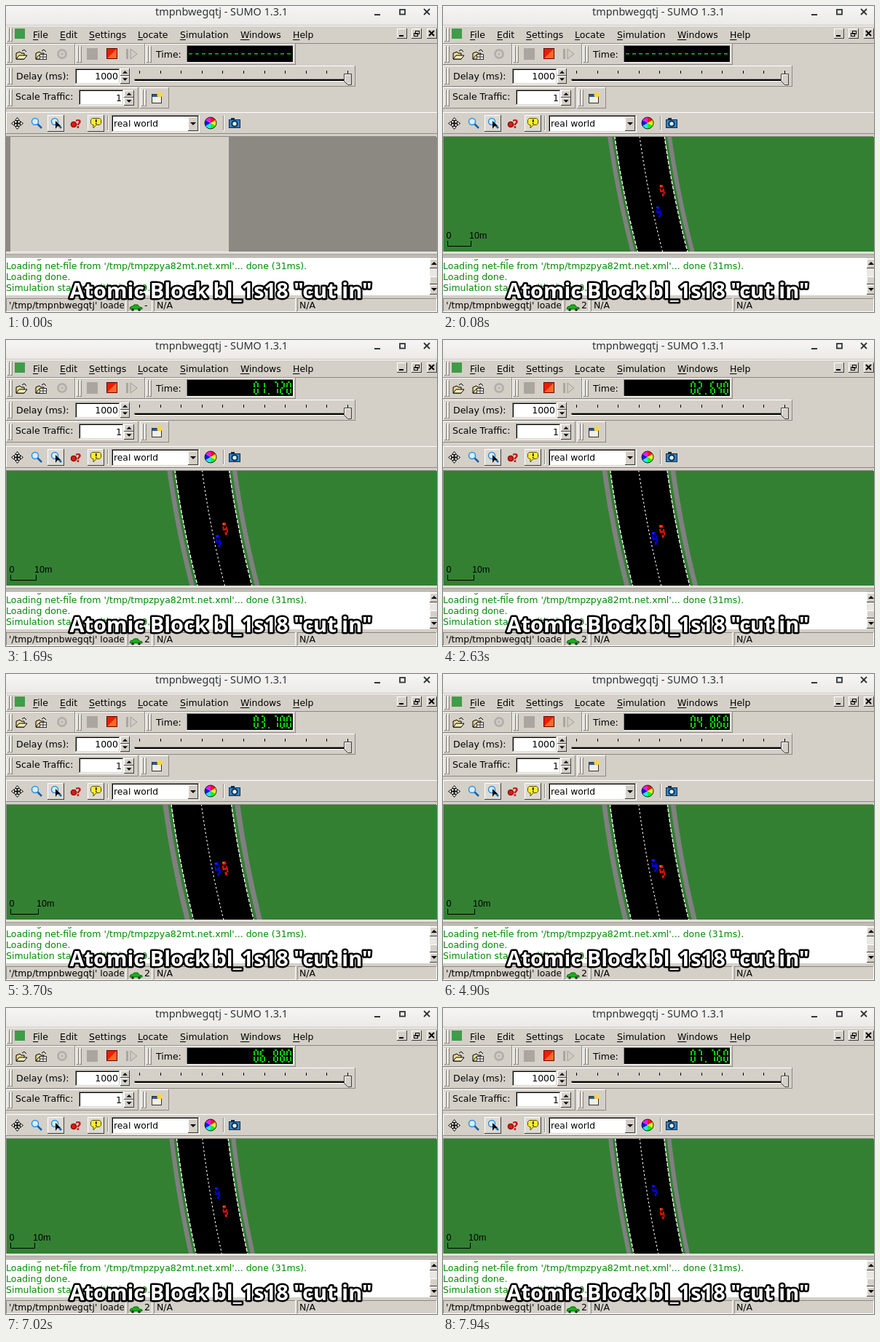
An HTML page with a canvas that plays this animation: 592 by 421 pixels, repeating every 8 s.

```html
<!DOCTYPE html>
<html lang="en">
<head>
<meta charset="utf-8">
<title>Traffic simulation window</title>
<style>
html, body { margin: 0; width: 100%; height: 100%; overflow: hidden; background: #d4d0c8; }
canvas { display: block; width: 592px; height: 421px; }
</style>
</head>
<body>
<canvas id="stage" width="592" height="421"></canvas>
<script>
const ctx = document.getElementById('stage').getContext('2d');
const LOOP = 8000, REPAINT = 50;
const UI = '"DejaVu Sans", sans-serif';
const FACE = '#d4d0c8', SHADE = '#8c8882';

// One car falls back while the other passes it; the view zooms to keep both in sight.
function poseAt(t) {
  const s = (t - 870) / 1000;
  const redY = 257 + 3.68 * s;
  const blueY = 280 - 4.1 * s;
  const gap = Math.abs(blueY - redY);
  return {
    redY, blueY,
    blueX: 291 + 2.5 * Math.exp(-Math.max(s, -1)),
    half: 41.5 - 0.25 * gap,
    top: 268.5 + 0.06 * gap,
    bottom: 301 - 0.75 * s,
    clock: 0.94 + 0.967 * (s + 0.02)
  };
}

function box(color, x, y, w, h) {
  ctx.fillStyle = color;
  ctx.fillRect(x, y, w, h);
}

function text(str, x, y, { size = 12.5, color = '#000', align = 'left', font = UI, weight = '' } = {}) {
  ctx.font = `${weight} ${size}px ${font}`;
  ctx.fillStyle = color;
  ctx.textAlign = align;
  ctx.fillText(str, x, y);
}

function clipped(x, y, w, h, paint) {
  ctx.save();
  ctx.beginPath();
  ctx.rect(x, y, w, h);
  ctx.clip();
  paint();
  ctx.restore();
}

function poly(color, points, stroke) {
  ctx.beginPath();
  points.forEach(([x, y]) => ctx.lineTo(x, y));
  ctx.closePath();
  if (color) { ctx.fillStyle = color; ctx.fill(); }
  if (stroke) { ctx.strokeStyle = stroke; ctx.lineWidth = 1; ctx.stroke(); }
}

function line(color, width, ...points) {
  ctx.beginPath();
  points.forEach(([x, y]) => ctx.lineTo(x, y));
  ctx.strokeStyle = color;
  ctx.lineWidth = width;
  ctx.stroke();
}

function frame(color, width, x, y, w, h) {
  ctx.strokeStyle = color;
  ctx.lineWidth = width;
  ctx.strokeRect(x, y, w, h);
}

function disc(color, x, y, r, stroke, width = 1) {
  ctx.beginPath();
  ctx.arc(x, y, r, 0, 7);
  if (color) { ctx.fillStyle = color; ctx.fill(); }
  if (stroke) { ctx.strokeStyle = stroke; ctx.lineWidth = width; ctx.stroke(); }
}

function bevel(x, y, w, h, light = '#fff', dark = SHADE) {
  box(light, x, y, w, 1);
  box(light, x, y, 1, h);
  box(dark, x, y + h - 1, w, 1);
  box(dark, x + w - 1, y, 1, h);
}

function sunken(x, y, w, h, fill) {
  box(fill, x, y, w, h);
  bevel(x, y, w, h, SHADE, '#fff');
}

function entry(x, y, w, h) {
  sunken(x, y, w, h, '#fff');
  bevel(x + 1, y + 1, w - 2, h - 2, '#000', FACE);
}

function button(x, y, w, h, fill = FACE) {
  box(fill, x, y, w, h);
  bevel(x, y, w, h, '#fff', '#404040');
}

function grip(x, y, h) {
  for (const dx of [0, 4]) bevel(x + dx, y, 3, h);
}

function toolbar(x, y, w, h) {
  bevel(x, y, w, h);
  grip(x + 2, y + 3, h - 6);
}

function triangle(x, y, r, up, color = '#000') {
  const d = up ? -r : r;
  poly(color, [[x - r, y - d / 2], [x + r, y - d / 2], [x, y + d / 2]]);
}

function spinner(x, y, w, h) {
  const half = Math.floor(h / 2);
  button(x, y, w, half);
  button(x, y + half, w, h - half);
  triangle(x + w / 2, y + half / 2, 3.5, true);
  triangle(x + w / 2, y + half * 1.5, 3.5, false);
}

function folder(x, y) {
  poly('#e9d78c', [[x, y + 5], [x + 5, y + 3], [x + 7, y + 5], [x + 11, y + 5], [x + 11, y + 13], [x, y + 13]], '#000');
  poly('#fff6c0', [[x + 4, y + 8], [x + 15, y + 8], [x + 11, y + 13], [x, y + 13]], '#000');
  line('#000', 1, [x + 8, y + 2], [x + 11, y], [x + 14, y + 3]);
}

function magnifier(x, y) {
  line('#1762a5', 2.5, [x + 2, y + 2], [x + 8, y + 8]);
  disc('#d8eefc', x - 1, y - 1, 4.5, '#2a90e0', 1.5);
}

function titleBar() {
  const g = ctx.createLinearGradient(0, 0, 0, 26);
  g.addColorStop(0, '#f6f5f3');
  g.addColorStop(1, '#eceae7');
  box(g, 0, 0, 592, 26);
  box('#c5c0b9', 0, 26, 592, 1);
  text('tmpnbwegqtj - SUMO 1.3.1', 296, 13, { size: 14.4, weight: 500, color: '#2e3436', align: 'center', font: '"Noto Sans", sans-serif' });
  box('#2e3436', 506, 11, 8, 2);
  frame('#2e3436', 1.8, 541, 5, 7, 6.5);
  line('#2e3436', 1.8, [574, 4], [582, 12]);
  line('#2e3436', 1.8, [582, 4], [574, 12]);
}

function menuBar() {
  bevel(0, 27, 594, 25);
  grip(2, 30, 19);
  box('#3f9c48', 12, 31, 14, 14);
  let x = 37;
  for (const name of ['File', 'Edit', 'Settings', 'Locate', 'Simulation', 'Windows', 'Help']) {
    text(name, x, 44);
    box('#000', x, 46, ctx.measureText(name[0]).width, 1);
    x += Math.round(ctx.measureText(name).width) + 16;
  }
  for (const left of [537, 557, 578]) button(left, 31, 14, 14);
  box('#000', 540, 40, 6, 2);
  frame('#000', 1, 562.5, 34.5, 5, 4);
  frame('#000', 1, 560.5, 37.5, 5, 4);
  line('#000', 2, [581, 34], [588, 41]);
  line('#000', 2, [588, 34], [581, 41]);
}

function runBar() {
  toolbar(0, 52, 95, 29);
  toolbar(95, 52, 96, 29);
  toolbar(191, 52, 207, 29);
  folder(14, 60);
  folder(41, 60);
  box('#f4f4f4', 46, 66, 9, 8);
  frame('#333', 1, 46.5, 66.5, 9, 7);
  line('#333', 1, [46, 70], [56, 70]);
  line('#333', 1, [51, 66], [51, 74]);
  disc(null, 77, 66, 5.5, '#b4b0a9', 3);
  disc('#bcb8b1', 77, 66, 2);
  box('#aaa69f', 111, 58, 15, 16);
  box('#f01c00', 138, 58, 15, 15);
  poly('#ff6a28', [[138, 73], [153, 58], [153, 73]]);
  bevel(138, 58, 15, 15, '#600', '#600');
  box('#aaa69f', 165, 59, 3, 14);
  poly('#d0ccc4', [[171, 59], [180, 66], [171, 73]], '#a09c95');
  text('Time:', 206, 71);
}

function delayBar() {
  toolbar(0, 82, 480, 29);
  text('Delay (ms):', 14, 101);
  entry(95, 86, 62, 22);
  text('1000', 154, 101, { align: 'right' });
  spinner(157, 86, 13, 21);
  for (let i = 0; i <= 10; i++) box('#000', Math.round(183 + i * 28.6), 89, 1, 4);
  sunken(176, 100, 299, 4, '#000');
  box('#fff', 177, 103, 296, 1);
  poly(FACE, [[464.5, 93.5], [474.5, 93.5], [474.5, 108.5], [469.5, 108.5], [464.5, 103.5]], '#404040');
  line('#fff', 1, [465.5, 103], [465.5, 94.5], [473, 94.5]);
}

function scaleBar() {
  toolbar(0, 112, 182, 29);
  toolbar(184, 112, 40, 29);
  text('Scale Traffic:', 13, 129);
  entry(100, 115, 62, 22);
  text('1', 159, 131, { align: 'right' });
  spinner(162, 116, 14, 21);
  box('#333', 200, 121, 14, 13);
  box('#f2f0e4', 201, 125, 12, 8);
  box('#2457a8', 201, 122, 12, 3);
  disc('#ffd63c', 211, 122, 3.5);
}

function viewBar() {
  bevel(0, 146, 594, 30);
  for (const [dx, dy] of [[1, 0], [-1, 0], [0, 1], [0, -1]]) {
    line('#000', 1.6, [15.5, 161.5], [15.5 + dx * 6, 161.5 + dy * 6]);
    poly('#fff', [[15.5 + dx * 8, 161.5 + dy * 8], [15.5 + dx * 4 + dy * 3, 161.5 + dy * 4 + dx * 3], [15.5 + dx * 4 - dy * 3, 161.5 + dy * 4 - dx * 3]], '#000');
  }
  magnifier(41, 160);
  button(57, 150, 23, 23, '#dedad3');
  magnifier(68, 160);
  poly('#000', [[68, 158], [75, 165], [71, 165], [68, 169]]);
  disc('#d61c12', 93, 163, 3.8, '#600');
  text('?', 95, 168, { size: 15, weight: 700, color: '#c81810' });
  button(112, 150, 23, 23, '#dedad3');
  poly('#ffee30', [[118.5, 154.5], [128.5, 154.5], [130.5, 156.5], [130.5, 161.5], [128.5, 163.5], [124, 163.5], [120, 168], [120, 163.5], [118.5, 163.5], [116.5, 161.5], [116.5, 156.5]], '#554d00');
  box('#000', 123, 156, 1.5, 4);
  box('#000', 123, 161, 1.5, 1.5);
  for (const x of [139, 298]) bevel(x, 151, 2, 21, SHADE, '#fff');
  entry(145, 150, 121, 24);
  text('real world', 148, 166, { size: 12.3 });
  button(250, 152, 14, 20);
  triangle(257, 162, 4, false);
  for (let i = 0; i < 6; i++) {
    ctx.beginPath();
    ctx.moveTo(281, 161);
    ctx.arc(281, 161, 8, i * Math.PI / 3 - 1.57, (i + 1) * Math.PI / 3 - 1.57);
    ctx.fillStyle = `hsl(${i * 60} 90% 52%)`;
    ctx.fill();
  }
  disc(null, 281, 161, 8, '#222');
  box('#102a44', 306, 156, 16, 12);
  box('#2f83c8', 307, 157, 14, 10);
  box('#102a44', 309, 154, 5, 3);
  disc('#d8efff', 314, 162, 3.6, '#123', 1.8);
}

const DIGITS = ['abcdef', 'bc', 'abged', 'abgcd', 'fgbc', 'afgcd', 'afgcde', 'abc', 'abcdefg', 'abcdfg'];

function drawDigit(digit, x) {
  const lit = s => DIGITS[digit].includes(s);
  [...'agd'].forEach((s, row) => lit(s) && box('#00d000', x + 2, 57 + row * 8, 3, 2));
  [...'fbec'].forEach((s, i) => lit(s) && box('#00d000', x + (i % 2) * 5, 59 + (i >> 1) * 8, 2, 6));
}

function clockDisplay(seconds) {
  const pitch = 9, left = 250;
  sunken(248, 54, 147, 24, '#000');
  if (seconds === null) {
    for (let i = 0; i < 16; i++) box('#00c800', left + 1 + i * pitch, 65, 5, 1.5);
    return;
  }
  const shown = (Math.round(seconds * 50) / 50).toFixed(3).padStart(6, '0');
  [...shown].forEach((c, i) => {
    const x = left + (10 + i) * pitch;
    if (c === '.') box('#00d000', x + 2, 73, 2, 2);
    else drawDigit(c, x);
  });
}

function roadLine(pose, offset, color, width, dash = []) {
  const { top, bottom, half } = pose, d = bottom - top;
  ctx.beginPath();
  for (let u = -0.15; u <= 1.2; u += 0.05) {
    ctx.lineTo(top + offset * half + d * (u - 0.3 * u * (1 - u)), 181 + u * 157);
  }
  ctx.setLineDash(dash);
  ctx.strokeStyle = color;
  ctx.lineWidth = width;
  ctx.stroke();
  ctx.setLineDash([]);
}

function car(x, y, color, lamp, scale) {
  ctx.save();
  ctx.translate(x, y);
  ctx.rotate(-0.17);
  ctx.scale(scale, scale);
  box(color, -3, -9, 5, 4);
  box(lamp, -3, -9, 3, 2);
  box(color, -4, -4, 2, 6);
  box(color, 1, -3, 2, 9);
  box(color, -2, -1, 3, 3);
  box(color, -2, 5, 3, 4);
  ctx.restore();
}

function roadView(pose, withCars) {
  const { half } = pose;
  box('#338033', 0, 180, 592, 160);
  roadLine(pose, 0, '#000', half * 1.97);
  for (const side of [-1, 1]) {
    roadLine(pose, side * 1.2, '#808080', half * 0.17);
    roadLine(pose, side, '#fff', 1.3, [5, 2]);
  }
  roadLine(pose, 0, '#fff', 1.1, [2.5, 3]);
  if (withCars) {
    car(pose.blueX, pose.blueY, '#0000f4', '#2020ff', half / 40);
    car(301.5, pose.redY, '#f41000', '#ff6a30', half / 40);
  }
  const end = Math.round(6 + half * 0.93);
  const label = { size: 12.5, font: '"Liberation Sans", sans-serif' };
  text('0', 4.5, 320, label);
  text('10m', end - 2, 320, label);
  line('#000', 1, [6.5, 323], [6.5, 330.5], [end + 0.5, 330.5], [end + 0.5, 323]);
}

function emptyView() {
  box(SHADE, 1, 180, 5, 158);
  box(SHADE, 306, 180, 286, 158);
}

function logPane() {
  box('#fff', 0, 338, 592, 1);
  box(SHADE, 0, 342, 592, 1);
  box(SHADE, 0, 345, 592, 1);
  box('#fff', 0, 346, 582, 52);
  clipped(0, 348, 582, 50, () => {
    const lines = ['Loading configuration ... done.', "Loading net-file from '/tmp/tmpzpya82mt.net.xml'... done (31ms).", 'Loading done.', 'Simulation started with time: 0.00.'];
    lines.forEach((s, i) => text(s, 0, 347 + i * 15, { color: '#008a00' }));
  });
  box('#e9e7e3', 582, 346, 10, 52);
  button(582, 348, 12, 13);
  button(582, 372, 12, 11);
  button(582, 384, 12, 13);
  triangle(588, 354, 4, true);
  triangle(588, 390, 4, false);
}

function statusBar(count) {
  box(FACE, 0, 398, 592, 23);
  for (const [x, w] of [[0, 165], [167, 34], [203, 195], [400, 192]]) bevel(x, 402, w, 19, SHADE, '#fff');
  clipped(0, 400, 162, 21, () => text("'/tmp/tmpnbwegqtj' loade", 4, 416, { size: 12.3 }));
  poly('#18b018', [[170, 417], [171, 414], [174, 413], [176, 411], [181, 411], [183, 414], [187, 415], [187, 417]], '#0a6a0a');
  disc('#222', 174, 418, 1.8);
  disc('#222', 183, 418, 1.8);
  text(count, 190, 416);
  text('N/A', 207, 416);
  text('N/A', 403, 416);
}

function caption() {
  const str = 'Atomic Block bl_1s18 "cut in"';
  ctx.font = '700 29px "Noto Sans", "Open Sans", sans-serif';
  ctx.textAlign = 'center';
  ctx.lineJoin = 'round';
  ctx.strokeStyle = '#000';
  ctx.lineWidth = 5;
  ctx.strokeText(str, 295, 401.5);
  ctx.fillStyle = '#fff';
  ctx.fillText(str, 295, 401.5);
  ctx.lineJoin = 'miter';
}

function draw(t) {
  const pose = poseAt(Math.floor(t / REPAINT) * REPAINT);
  box(FACE, 0, 0, 592, 421);
  titleBar();
  menuBar();
  runBar();
  delayBar();
  scaleBar();
  viewBar();
  clockDisplay(t < 360 ? null : pose.clock);
  bevel(0, 179, 592, 160, SHADE, '#fff');
  clipped(1, 180, 591, 158, () => t < 30 ? emptyView() : roadView(pose, t >= 80));
  logPane();
  statusBar(t < 80 ? '-' : '2');
  caption();
}

const began = performance.now();
function tick() {
  draw((performance.now() - began) % LOOP);
  requestAnimationFrame(tick);
}
tick();
</script>
</body>
</html>
```
